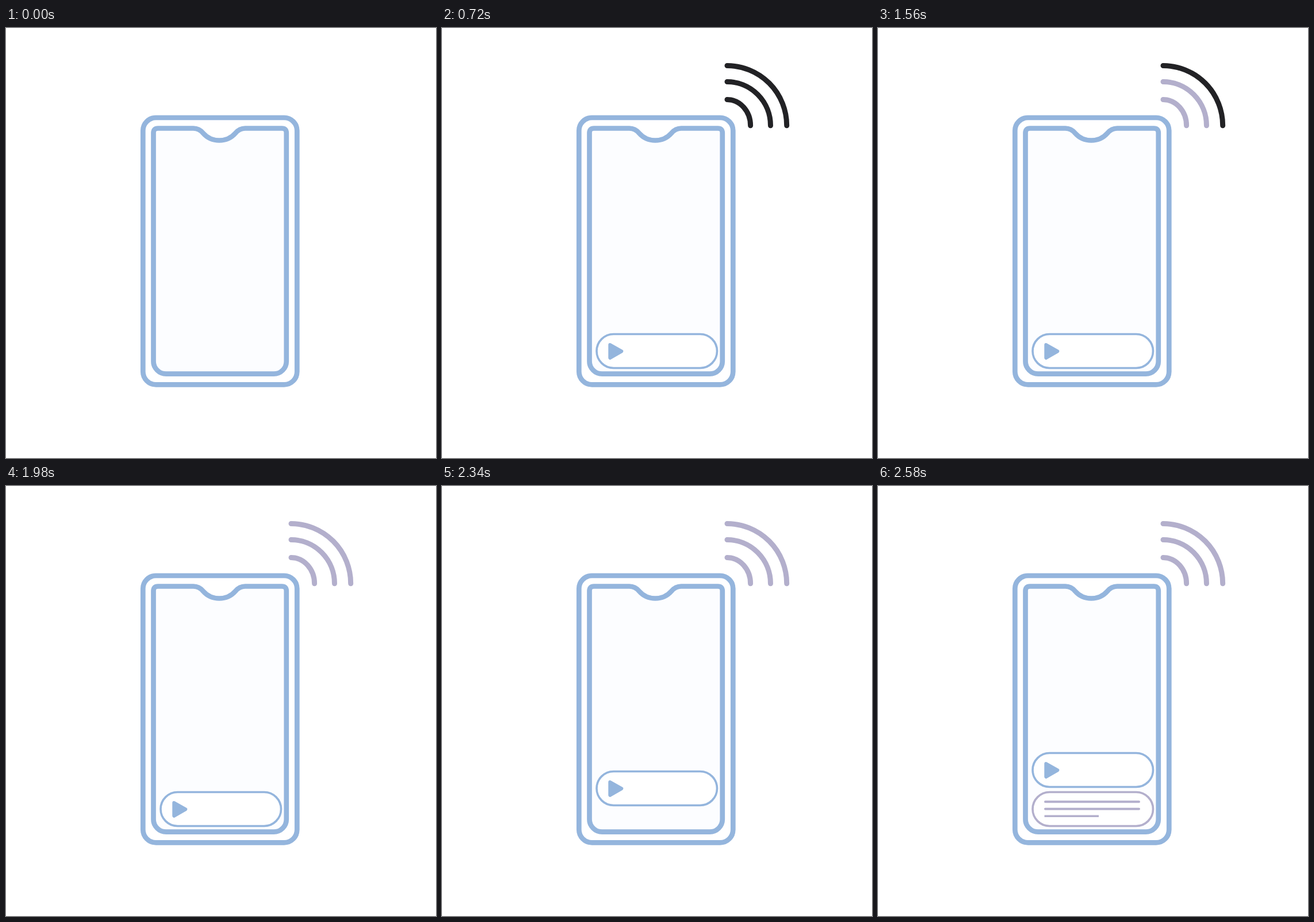
Animation of 748 by 748 pixels, one loop 3.84 s. Source, as an HTML page:

```html
<!DOCTYPE html>
<html lang="en">
<head>
<meta charset="utf-8">
<title>Phone message</title>
<style>
  html, body { margin: 0; width: 100%; height: 100%; overflow: hidden; background: #fff; }
  svg { display: block; width: 100vw; height: 100vh; }
  .blue { stroke: #94b5dd; }
  .lilac { stroke: #b3afcc; }
  .frame { stroke-width: 8.7; }
  .pill { stroke-width: 3.6; fill: #fff; }
  #waves { stroke-width: 9; stroke-linecap: round; }
</style>
</head>
<body>
<svg viewBox="0 0 748 748" fill="none">
  <g class="blue frame">
    <rect x="238.3" y="156" width="268" height="464.3" rx="22.5"/>
    <path fill="#fcfdff" d="M264.5 174.5H326C333 174.5 338 177 343 183C350 191 360 195.5 371 195.5
      C382 195.5 392 191 399 183C404 177 409 174.5 416 174.5H479.8Q487.8 174.5 487.8 182.5
      V579.7A22 22 0 0 1 465.8 601.7H278.5A22 22 0 0 1 256.5 579.7V182.5Q256.5 174.5 264.5 174.5Z"/>
  </g>
  <g id="video" class="blue">
    <rect class="pill" x="269" y="532.5" width="209.5" height="59" rx="29.5"/>
    <path fill="#94b5dd" stroke-width="6" stroke-linejoin="round" d="M292.3 551L312.3 562.3L292.3 573.8Z"/>
  </g>
  <g id="message" class="lilac">
    <rect class="pill" x="269" y="532.5" width="209.5" height="59" rx="29.5"/>
    <path stroke-width="4" stroke-linecap="round" d="M291 549.3H454M291 561.8H454"/>
    <path stroke-width="3.6" d="M289.5 574.3H384"/>
  </g>
  <g id="waves">
    <path d="M496 124.5A40.6 45.2 0 0 1 536.6 169.7"/>
    <path d="M496 93.5A75.5 76.2 0 0 1 571.5 169.7"/>
    <path d="M496 65.5A103.7 104.2 0 0 1 599.7 169.7"/>
  </g>
</svg>
<script>
  const LOOP = 3840, STEP = 60;
  const video = document.getElementById('video');
  const message = document.getElementById('message');
  const waves = document.getElementById('waves');
  const start = performance.now();

  const show = (element, visible) => { element.style.display = visible ? '' : 'none'; };

  function draw() {
    const time = (performance.now() - start) % LOOP;
    const stepped = Math.floor(time / STEP) * STEP;
    const rise = Math.max(0, Math.min(68, (stepped - 2124) / 6));

    show(video, time >= 300);
    show(waves, time >= 720);
    show(message, time >= 2580);
    video.setAttribute('transform', `translate(0 ${-rise})`);
    [...waves.children].forEach((wave, i) => {
      wave.style.stroke = time < 1140 + i * 420 ? '#222225' : '#b3afcc';
    });
    requestAnimationFrame(draw);
  }
  draw();
</script>
</body>
</html>
```
